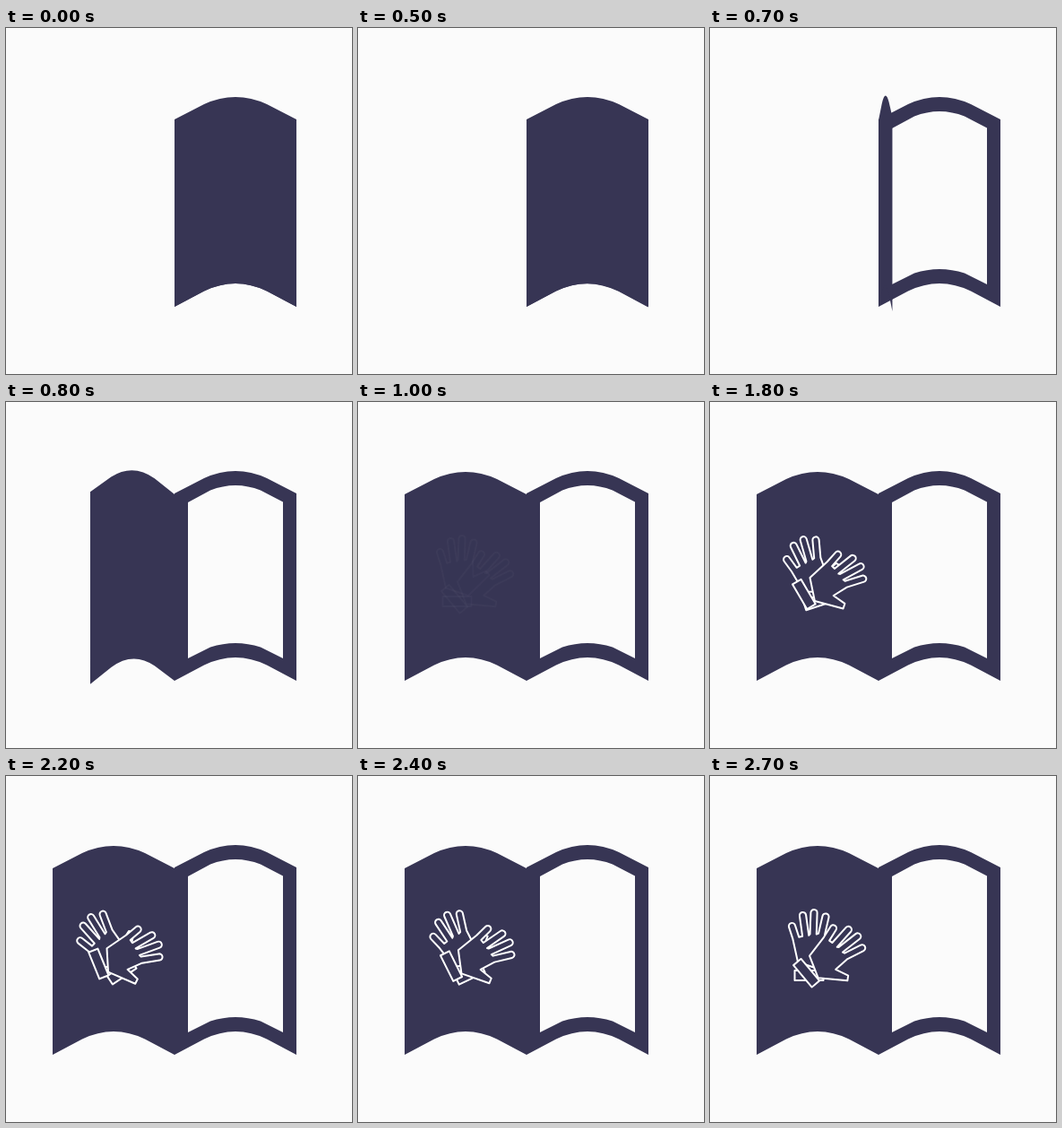
Animation of 386x386 px, one loop 3 s. Source, as an HTML page with a canvas:

```html
<!DOCTYPE html>
<html lang="en">
<head>
<meta charset="utf-8">
<title>Book and gloves</title>
<style>
html, body { margin: 0; width: 100%; height: 100%; overflow: hidden; background: #fbfbfb; }
canvas { display: block; width: 386px; height: 386px; filter: blur(.5px); }
</style>
</head>
<body>
<canvas id="stage"></canvas>
<script>
const NAVY = '#373554', PAPER = '#fbfbfb';
const SIZE = 386, LOOP = 3000, STEP = 100;
const SPINE = 188, MIDDLE = 193, DEPTH = 3300;
const canvas = document.getElementById('stage');
const ctx = canvas.getContext('2d');
const ratio = window.devicePixelRatio || 1;
canvas.width = canvas.height = SIZE * ratio;

const rad = deg => deg * Math.PI / 180;
const progress = (t, from, to) => Math.min(1, Math.max(0, (t - from) / (to - from)));
const easeInOut = p => (1 - Math.cos(Math.PI * p)) / 2;

// Sheet turned around the spine, seen in slight perspective.
function page(angle, top) {
  const at = (u, y) => {
    const scale = DEPTH / (DEPTH - u * Math.sin(angle));
    return [SPINE + u * Math.cos(angle) * scale, MIDDLE + (y - MIDDLE) * scale];
  };
  ctx.beginPath();
  ctx.moveTo(...at(0, top));
  ctx.lineTo(...at(33, top - 17));
  ctx.quadraticCurveTo(...at(68, top - 33), ...at(103, top - 17));
  ctx.lineTo(...at(136, top));
  ctx.lineTo(...at(136, 311));
  ctx.lineTo(...at(103, 293.5));
  ctx.quadraticCurveTo(...at(68, 276.5), ...at(33, 293.5));
  ctx.lineTo(...at(0, 311));
  ctx.fillStyle = NAVY;
  ctx.fill();
}

const opening = new Path2D(
  'M203 112 L228 98.5 Q256 87.5 284 98.5 L309 111.5 V286 L284 273.5 Q256 264.5 228 273.5 L203 286 Z');

// Each finger: tip centre, lean in degrees, length.
const fingers = [
  [-20.5, -50.5, -18, 14],
  [-8.5, -62.5, -8, 23],
  [4, -65.5, 2, 24],
  [17, -61, 13, 20]
];

const hand = new Path2D();
hand.moveTo(-14, -10.5);
for (const [x, y, lean, length] of fingers) {
  const r = 3.6, c = Math.cos(rad(lean)), s = Math.sin(rad(lean));
  hand.lineTo(x - r * c - length * s, y - r * s + length * c);
  hand.arc(x, y, r, rad(lean + 180), rad(lean + 360));
  hand.lineTo(x + r * c - length * s, y + r * s + length * c);
}
for (const point of [[16.5, -23], [30.6, -29.4], [34.5, -25], [11, -2]]) hand.lineTo(...point);
hand.closePath();

const cuff = new Path2D();
cuff.rect(-17.5, -1, 32, 11);

function glove(base, turn, cx, cy) {
  ctx.save();
  ctx.translate(cx, cy);
  ctx.rotate(rad(turn));
  ctx.translate(112 - cx, 218 - cy);
  ctx.rotate(rad(base));
  ctx.fillStyle = NAVY;
  ctx.strokeStyle = '#fff';
  ctx.lineWidth = 2;
  ctx.lineJoin = 'round';
  for (const part of [hand, cuff]) {
    ctx.fill(part);
    ctx.stroke(part);
  }
  ctx.restore();
}

function draw(now) {
  const t = Math.floor(now % LOOP / STEP) * STEP;
  ctx.setTransform(ratio, 0, 0, ratio, 0, 0);
  ctx.fillStyle = PAPER;
  ctx.fillRect(0, 0, SIZE, SIZE);

  page(0, 102);
  ctx.fillStyle = PAPER;
  ctx.fill(opening);
  page(Math.PI * easeInOut(progress(t, 430, 995)), 103);

  const spread = t < 2250
    ? Math.sin(Math.PI / 2 * progress(t, 1550, 2250))
    : 1 - easeInOut(progress(t, 2250, 2700));
  ctx.globalAlpha = progress(t, 985, 1500);
  glove(0, -34 * spread, 114, 190);
  glove(50, 18 * spread, 138, 201);
  ctx.globalAlpha = 1;

  requestAnimationFrame(draw);
}
requestAnimationFrame(draw);
</script>
</body>
</html>
```
